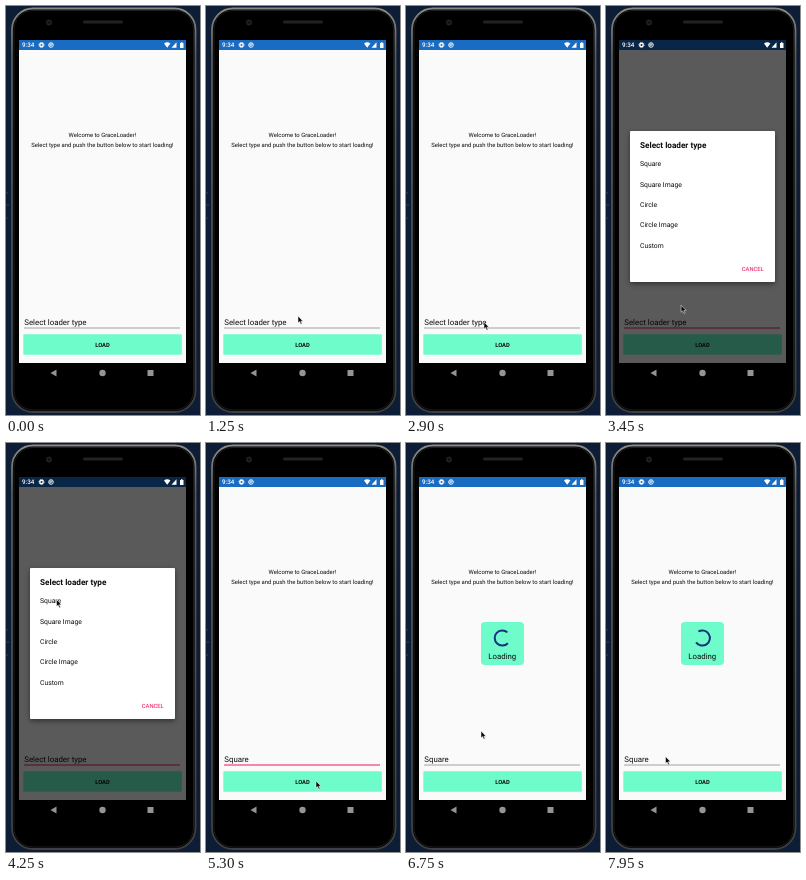
These frames come from a looping animation (194 px wide and 409 px high, 8 s). An HTML page:

```html
<!DOCTYPE html>
<html lang="en">
<head>
<meta charset="utf-8">
<title>Loader demo</title>
<style>
  html, body { margin: 0; width: 100%; height: 100%; overflow: hidden; background: #0c1d35; }
  svg { display: block; width: 100vw; height: 100vh; }
  text { font-family: Roboto, sans-serif; fill: #0c0c0c; text-rendering: geometricPrecision; }
  .mid { text-anchor: middle; }
  .medium { font-weight: 500; }
  .bold { font-weight: 700; }
  #dialog { filter: drop-shadow(0 2px 2.500px rgba(0, 0, 0, .45)); }
</style>
</head>
<body>
<svg viewBox="0 0 194 409">
  <defs>
    <linearGradient id="metal" x2="0" y2="1">
      <stop stop-color="#8b8985"/>
      <stop offset=".12" stop-color="#5b5a58"/>
      <stop offset="1" stop-color="#403f3f"/>
    </linearGradient>
  </defs>
  <rect width="194" height="409" fill="#0c1d35"/>
  <path d="M0 187h2M0 199h3M0 212h2" stroke="#27415c"/>

  <!-- Phone -->
  <rect x="6" y="2.500" width="183.500" height="403.500" rx="21" fill="#000" stroke="url(#metal)" stroke-width="1.800"/>
  <rect x="8" y="4.500" width="179.500" height="399.500" rx="19" fill="none" stroke="#1d1d1d"/>
  <rect x="77" y="14.500" width="40" height="3" rx="1.500" fill="#222"/>
  <circle cx="43" cy="16.500" r="2.500" fill="#10151c" stroke="#2c3036" stroke-width=".8"/>
  <g fill="#949494">
    <path d="M50.500 363.500v7l-6-3.500z"/>
    <circle cx="96.500" cy="367" r="3.200"/>
    <rect x="141.500" y="364" width="6" height="6"/>
  </g>

  <!-- App -->
  <rect x="13" y="34" width="167" height="323" fill="#fafafa"/>
  <rect x="13" y="34" width="167" height="10" fill="#1a6bc2"/>
  <text class="mid" x="96.400" y="130.700" font-size="5.900">Welcome to GraceLoader!</text>
  <text class="mid" x="96.400" y="141.200" font-size="5.900">Select type and push the button below to start loading!</text>

  <text id="field" x="18.300" y="318.800" font-size="7.850"></text>
  <path id="underline" d="M18 322h156"/>
  <rect x="17.300" y="328.300" width="158.500" height="20.500" rx=".8" fill="#6dfcca"/>
  <rect id="press" x="17.300" y="328.300" width="158.500" height="20.500" rx=".8" fill="#000"/>
  <text class="mid bold" x="96.500" y="340.700" font-size="5.800">LOAD</text>

  <!-- Loader -->
  <g id="loader">
    <rect x="75" y="179" width="43" height="43" rx="4" fill="#6dfcca"/>
    <path id="ring" fill="none" stroke="#18317c" stroke-width="2"/>
    <text class="mid" x="96.300" y="215.800" font-size="7.800">Loading</text>
  </g>

  <!-- Type picker -->
  <rect id="scrim" x="13" y="34" width="167" height="323"/>
  <g id="dialog">
    <rect x="24" y="125" width="145" height="151" rx="1" fill="#fff"/>
    <text class="bold" x="34" y="141.500" font-size="8.200">Select loader type</text>
    <g id="items" font-size="6.800"></g>
    <text class="medium" x="135.800" y="265" font-size="5.800" style="fill:#f0397c">CANCEL</text>
  </g>

  <!-- Status icons stay bright above the scrim -->
  <text class="medium" x="16" y="41.300" font-size="6.300" style="fill:#fff">9:34</text>
  <g fill="none" stroke="#fff">
    <circle cx="35.500" cy="39" r="1.700" stroke-width="1.400"/>
    <circle cx="35.500" cy="39" r="2.600" stroke-width=".8" stroke-dasharray="1 1.040"/>
    <circle cx="45" cy="39" r="2.300" stroke-width=".9"/>
    <path d="M44 40.500v-2.500h2v1.200h-2" stroke-width=".7"/>
  </g>
  <path d="M158 37.500q3.200-2.400 6.400 0l-3.200 4.300zM165.500 41.800h5v-5.500zM174 37h1v-.8h1.500v.8h1v4.900h-3.500z" fill="#fff"/>

  <path id="cursor" d="M0 0v7l1.600-1.400 1.200 2.700 1.200-.5-1.200-2.600h2.200z" fill="#080808" stroke="#fff" stroke-width=".5"/>
</svg>
<script>
const LOOP = 8000, OPEN = 3150, PICK = 4450, PRESS = 5500, LOAD = 5700;
const $ = id => document.getElementById(id);
const clamp = v => Math.min(1, Math.max(0, v));
const ramp = (t, from, length) => clamp((t - from) / length);
const smooth = u => u * u * (3 - 2 * u);

['Square', 'Square Image', 'Circle', 'Circle Image', 'Custom'].forEach((name, i) => {
  const item = document.createElementNS('http://www.w3.org/2000/svg', 'text');
  item.setAttribute('x', 34);
  item.setAttribute('y', 160.2 + i * 20.4);
  item.textContent = name;
  $('items').append(item);
});

// time, x, y of the pointer tip
const pointerPath = [
  [650, 150, 357], [1150, 92, 310], [1500, 92, 310], [2400, 78, 316], [3300, 78, 316],
  [4050, 50.5, 156.5], [4550, 50.5, 156.5], [5200, 110, 338], [5750, 110, 338],
  [6500, 75, 288], [7000, 75, 288], [7800, 59.5, 313.5], [8000, 59.5, 313.5]
];

function pointerAt(t) {
  const i = Math.max(1, pointerPath.findIndex(p => p[0] > t));
  const [t0, x0, y0] = pointerPath[i - 1], [t1, x1, y1] = pointerPath[i];
  const u = smooth(ramp(t, t0, t1 - t0));
  return [x0 + (x1 - x0) * u, y0 + (y1 - y0) * u];
}

// Cubic easing through (0,0) and (1,1), solved by bisection
function bezier(x, x1, y1, x2, y2) {
  const curve = (u, a, b) => 3 * u * (1 - u) ** 2 * a + 3 * u * u * (1 - u) * b + u ** 3;
  let lo = 0, hi = 1;
  for (let i = 0; i < 20; i++) {
    const mid = (lo + hi) / 2;
    if (curve(mid, x1, x2) < x) lo = mid; else hi = mid;
  }
  return curve(lo, y1, y2);
}

// Indeterminate ring: head sweeps in the first half of a cycle, tail in the second
function ringPath(t) {
  const cycle = (t - 6750) / 1333 + 10.52, p = cycle % 1;
  const head = 270 * bezier(clamp(p * 2), .4, 0, .2, 1);
  const tail = 270 * bezier(clamp(p * 2 - 1), .4, 0, .2, 1);
  const base = 42 + (cycle - 10.52) * 90 + Math.floor(cycle - 10) * 270 + (t - 6750) / 4200 * 720;
  const start = base + tail, sweep = Math.max(8, head - tail);
  const point = deg => {
    const a = deg * Math.PI / 180;
    return `${96.3 + 7.6 * Math.cos(a)} ${195 + 7.6 * Math.sin(a)}`;
  };
  return `M${point(start)}A7.6 7.6 0 ${sweep > 180 ? 1 : 0} 1 ${point(start + sweep)}`;
}

function draw(t) {
  const shown = smooth(ramp(t, OPEN, 180)) * (1 - smooth(ramp(t, PICK, 180)));
  $('scrim').setAttribute('opacity', .64 * shown);
  $('dialog').setAttribute('opacity', shown);

  const focused = t >= OPEN - 100 && t < LOAD;
  $('field').textContent = t < PICK + 60 ? 'Select loader type' : 'Square';
  $('underline').setAttribute('stroke', focused ? '#f0609a' : '#8c8c92');
  $('underline').setAttribute('stroke-width', focused ? 1.4 : .8);

  $('press').setAttribute('opacity', t > PRESS && t < LOAD ? .08 : 0);
  $('loader').setAttribute('opacity', ramp(t, LOAD, 120));
  $('ring').setAttribute('d', ringPath(t));

  $('cursor').setAttribute('visibility', t < pointerPath[0][0] ? 'hidden' : 'visible');
  $('cursor').setAttribute('transform', `translate(${pointerAt(t)})`);
}

const begin = performance.now();
function tick() {
  draw((performance.now() - begin) % LOOP);
  requestAnimationFrame(tick);
}
tick();
</script>
</body>
</html>
```
